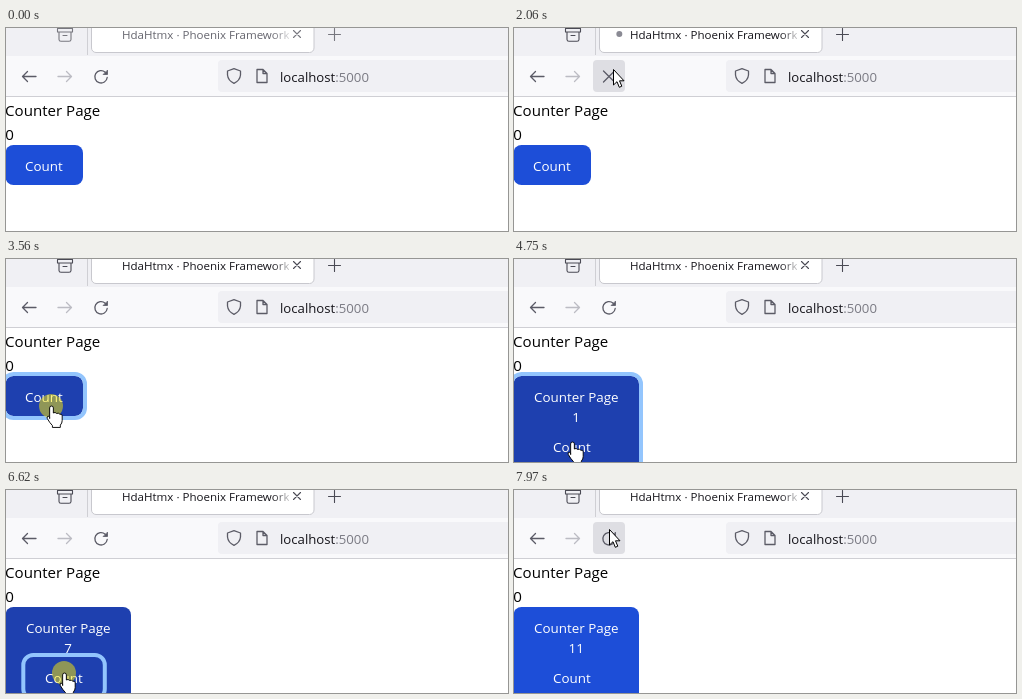
An HTML page that plays this animation: 502 px wide and 203 px high, repeating every 8 s.

```html
<!DOCTYPE html>
<html lang="en">
<head>
<meta charset="utf-8">
<title>Counter</title>
<style>
  html, body { margin: 0; width: 100%; height: 100%; overflow: hidden; background: #fff; }
  svg { display: block; width: 502px; height: 203px; font-family: "Open Sans", "Noto Sans", sans-serif; }
  .icon { fill: none; stroke: #5b5b66; stroke-width: 1.3; stroke-linecap: round; stroke-linejoin: round; }
  .strip { stroke-width: 1.1; }
  .ring { fill: none; stroke: #93c5fd; stroke-width: 4; }
  .label { fill: #fff; font-size: 13.4px; }
  .pointer { fill: #fff; stroke: #000; stroke-linejoin: round; }
</style>
</head>
<body>
<svg id="stage" viewBox="0 0 502 203">
  <defs>
    <linearGradient id="fade" gradientUnits="userSpaceOnUse" x1="266" x2="288" y1="0" y2="0">
      <stop stop-color="currentColor"/>
      <stop offset="1" stop-color="currentColor" stop-opacity="0"/>
    </linearGradient>
    <clipPath id="tabClip"><rect x="86" y="-10" width="222" height="34" rx="4"/></clipPath>
    <clipPath id="titleClip"><rect x="110" y="-5" width="173" height="25"/></clipPath>
  </defs>

  <!-- tab strip -->
  <rect width="502" height="28" fill="#f0f0f4"/>
  <path d="M81.5 0V27" stroke="#cfcfd4"/>
  <rect x="85.5" y="-10" width="222.5" height="34.5" rx="4.5" fill="#fff" stroke="#c8c8ce"/>
  <circle id="burst" cx="101" cy="6" fill="#b3dcff" clip-path="url(#tabClip)"/>
  <rect id="throbber" y="3" width="6" height="6" rx="3" fill="#8a8a94"/>
  <text x="116" y="11" font-size="11.55" fill="url(#fade)" clip-path="url(#titleClip)">HdaHtmx · Phoenix Framework</text>
  <g class="icon strip" id="stripIcons">
    <path d="M51.5 .5H66.5V4H51.5ZM53 4V11.5Q53 13.3 55 13.3H63Q65 13.3 65 11.5V4M57 7.5H61"/>
    <path d="M287.5 2.5L294.5 9.5M294.5 2.5L287.5 9.5"/>
    <path d="M322.5 6.5H334.5M328.5 .5V12.5"/>
  </g>

  <!-- toolbar -->
  <rect y="28" width="502" height="40" fill="#f9f9fb"/>
  <path d="M0 68.5H502" stroke="#cfcfd4"/>
  <rect id="reloadHover" x="79" y="32" width="32" height="32" rx="4" fill="#dedee3"/>
  <rect x="212" y="32" width="300" height="32" rx="4" fill="#f0f0f4"/>
  <g class="icon">
    <path d="M30 48.5H16.5M21.5 43.5L16.5 48.5L21.5 53.5"/>
    <path d="M52 48.5H65.5M60.5 43.5L65.5 48.5L60.5 53.5" stroke="#bcbcc3"/>
    <g id="reload">
      <path d="M99.2 44.2A6.2 6.2 0 1 0 101.2 49.5"/>
      <path d="M101.5 42.5V46.5H97.5Z" fill="#5b5b66" stroke-width=".8"/>
    </g>
    <path id="stop" d="M89.5 43L100.5 54M100.5 43L89.5 54"/>
    <path d="M228 40.7L234.5 43V47Q234 52.5 228 55.3Q222 52.5 221.5 47V43Z"/>
    <path d="M251 41.5H257L261 45.5V54.5H251ZM257 41.5V45.5H261"/>
  </g>
  <text x="274" y="53.5" font-size="13.2" fill="#15141a">localhost<tspan fill="#7b7b84">:5000</tspan></text>

  <!-- page -->
  <g font-size="15.1">
    <text x="-1" y="88">Counter Page</text>
    <text x="-.8" y="112">0</text>
  </g>
  <rect id="button" x="-.5" y="117" rx="8"/>
  <rect id="outerRing" class="ring" x="-2.5" y="115" rx="10"/>
  <g id="nested">
    <text class="label" x="20" y="143">Counter Page</text>
    <text class="label" id="count" x="62.2" y="163" text-anchor="middle"></text>
    <rect id="innerRing" class="ring" x="17.3" y="165" width="81.5" height="44" rx="10"/>
  </g>
  <text class="label" id="caption">Count</text>

  <g id="cursor">
    <circle id="mark" r="12" fill="#ffeb00" fill-opacity=".5"/>
    <path id="arrow" class="pointer" d="M.5 .5V16L4 12.7L6.3 18.3L8.8 17.2L6.5 11.8H11Z"/>
    <path id="hand" class="pointer" transform="translate(.5 .5) scale(.93)" d="M-2 13V1.5a2 2 0 0 1 4 0V7q2-1.5 3.5.5q2-1 3.5.8q2.5-.5 2.5 1.7V15q0 3-2 5V22.5H1V20.5q-3-3-5.5-7.5q-1-2.5 1-2.5q1 0 1.5 1.5z"/>
  </g>
</svg>
<script>
const LOOP = 8000, STEP = 68.4;
const $ = id => document.getElementById(id);
const show = (id, on) => $(id).style.display = on ? "" : "none";
const set = (id, attrs) => { for (const k in attrs) $(id).setAttribute(k, attrs[k]); };
const within = (t, a, b) => t >= a && t < b;

// time, x, y of the pointer tip
const path = [
  [410, 379, 182], [752, 214, 34], [952, 214, 34], [1368, 111, 31], [1500, 97, 41],
  [1780, 97, 41], [1850, 99, 41], [2599, 99, 41], [3140, 49, 150], [3290, 49, 150],
  [3350, 45, 147], [4285, 45, 147], [4690, 58, 183], [7480, 58, 183], [7930, 95, 39]
];
// press time and the count it leads to
const clicks = [[3560, 1], [4810, 3], [5480, 4], [6010, 7], [6620, 9], [7150, 11]];
const RESPONSE = 130, LOAD = 1780, LOADED = 2530;

function pointerAt(t) {
  const i = path.findIndex(p => p[0] > t);
  if (i < 0) return path[path.length - 1].slice(1);
  if (!i) return path[0].slice(1);
  const [t0, x0, y0] = path[i - 1], [t1, x1, y1] = path[i];
  const u = (t - t0) / (t1 - t0), e = u * u * (3 - 2 * u);
  return [x0 + (x1 - x0) * e, y0 + (y1 - y0) * e];
}

function draw(t) {
  const q = Math.floor((t + 8) / STEP) * STEP;
  const [x, y] = pointerAt(q);
  const visible = t >= 410;
  const first = clicks[0][0], second = clicks[1][0];
  const nested = t >= first + RESPONSE;
  const width = nested ? 125.5 : 77.5, height = nested ? 100 : 40;
  const over = visible && x < width && y >= 117 && y < 117 + height;
  const press = clicks.filter(c => c[0] <= t).pop();
  const since = press ? t - press[0] : Infinity;
  const done = clicks.filter(c => c[0] + RESPONSE <= t).pop();

  // window and tab
  const active = t >= LOAD;
  $("stage").style.color = active ? "#15141a" : "#65656e";
  $("stripIcons").style.stroke = active ? "#4a4a54" : "#77777f";
  const loading = within(t, LOAD + 140, LOADED);
  show("throbber", loading);
  set("throbber", { x: 98 + 5 * Math.sin((q - LOAD) / 130) });
  const b = (q - LOADED) / 400;
  show("burst", within(b, 0, 1));
  set("burst", { r: Math.max(0, 22 + 175 * b), opacity: Math.min(1, 1.3 * (1 - b)) });
  show("stop", loading);
  show("reload", !loading);
  set("reload", { opacity: within(t, LOADED, 3160) ? .75 : 1 });
  show("reloadHover", visible && within(x, 79, 111) && within(y, 32, 64));

  // counter button
  set("button", { width, height, fill: over ? "#1e40af" : "#1d4ed8" });
  set("outerRing", { width: width + 4, height: height + 4 });
  show("outerRing", within(t, first, second));
  show("nested", nested);
  show("innerRing", t >= second && since < RESPONSE);
  $("count").textContent = done ? done[1] : "";
  set("caption", nested ? { x: 39, y: 193 } : { x: 19, y: 143 });

  // pointer
  show("cursor", visible);
  set("cursor", { transform: `translate(${Math.round(x)} ${Math.round(y)})` });
  show("mark", since < (t < second ? RESPONSE : 200));
  show("hand", over);
  show("arrow", !over);
}

function tick(now) {
  draw(now % LOOP);
  requestAnimationFrame(tick);
}
draw(0);
requestAnimationFrame(tick);
</script>
</body>
</html>
```
